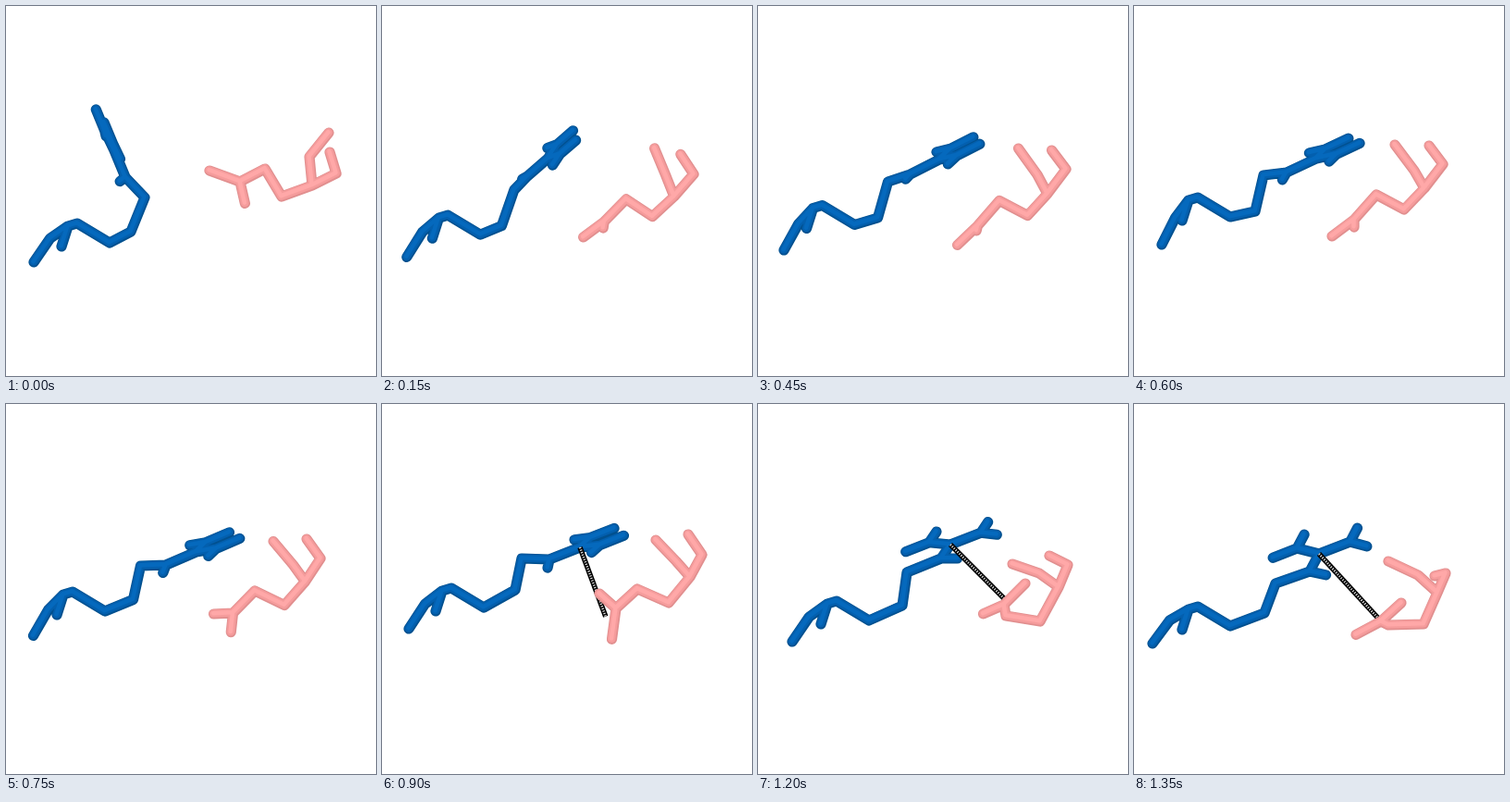
An HTML page for the animation above (1500 ms loop, 400 by 400 pixels).

```html
<!DOCTYPE html>
<html lang="en">
<head>
<meta charset="utf-8">
<title>Two molecules</title>
<style>
html, body { margin: 0; width: 100%; height: 100%; overflow: hidden; background: #fff; }
svg { display: block; width: 100%; height: 100%; }
path { fill: none; stroke-linecap: round; stroke-linejoin: round; }
.pose { opacity: 0; animation: show 1.5s step-end infinite; animation-delay: calc((var(--i) - 10) * 150ms); }
@keyframes show { 0% { opacity: 1; } 10%, 100% { opacity: 0; } }
.blue { --edge: #01508f; --body: #035fae; --shine: #0569bd; }
.pink { --edge: #e18f8f; --body: #f59c9c; --shine: #ffa8a8; }
.edge { stroke: var(--edge); stroke-width: 11.2; }
.body { stroke: var(--body); stroke-width: 8.6; transform: translate(-.3px, -.5px); }
.shine { stroke: var(--shine); stroke-width: 4.6; transform: translate(-.5px, -.8px); }
.link path { stroke: #000; stroke-width: 5.6; stroke-linecap: butt; }
.link .gaps { stroke: #ddd; stroke-width: 2.6; stroke-dasharray: 1.2 1.5; }
</style>
</head>
<body>
<svg id="stage" viewBox="0 0 400 400"></svg>
<script>
const points = text => text.split(' ').map(p => p.split(',').map(Number));
const mix = (a, b, t) => a.map((p, i) => p.map((v, k) => v + (b[i][k] - v) * t));

// blue: tail tip, tail root, two bends, centre of the flat head and its two axes.
// pink: oxygen, its carbon, then the chain to the fork and both prongs.
const pose = (blue, pink, linked) => ({ blue: points(blue), pink: points(pink), linked });
const between = (a, b, t) => ({ blue: mix(a.blue, b.blue, t), pink: mix(a.pink, b.pink, t) });

const folded = pose(
  '30,277 77,235 135,244 150,207 117,156 5,8 12,29',
  '220,178 253,190 280,176 298,206 331,194 328,163 349,137 357,181 350,158');
const reaching = pose(
  '26,270 70,224 128,236 141,197 195,167 1,5.5 -31,17',
  '217,268 237,244 260,217 291,233 312,209 301,187 281,158 332,182 316,161');
const level = pose(
  '30,258 69,207 131,222 140,183 197,165 7,3 -32,15',
  '214,249 238,231 262,204 292,220 314,197 303,178 282,150 334,171 319,151');
const touching = pose(
  '29,243 75,199 144,201 151,167 214,155 6,4.5 -33,13',
  '235,205 253,221 276,200 310,215 333,187 318,170 296,147 346,163 331,141', true);
const spread = pose(
  '32,245 86,209 155,212 161,181 203,141 33,-5 -7,22',
  '253,214 267,228 282,200 313,214 334,185 315,176 285,159 345,157 328,136');
const bonded = pose(
  '37,257 85,213 156,218 161,182 208,152 32,-6 -10,15',
  '289,194 266,217 268,229 305,235 325,198 304,183 275,173 335,174 315,164', true);
const relaxed = pose(
  '20,259 69,219 141,226 153,194 200,162 33,-4 -10,19',
  '289,215 267,235 275,239 313,238 328,204 307,185 275,170 337,183 325,186', true);

const poses = [
  folded, between(folded, reaching, .8), reaching, between(reaching, level, .5), level,
  between(level, touching, .5), touching, spread, bonded, relaxed
];

const add = ([x, y], [dx, dy], s = 1) => [x + dx * s, y + dy * s];
const sub = (a, b) => add(a, b, -1);
const path = chains => chains.map(c => 'M' + c.map(p => p.join(' ')).join('L')).join('');

// Three equal bonds around a flat atom cancel out, which gives the third one.
const third = (atom, a, b, length) => add(atom, add(sub(a, atom), sub(b, atom)), -length);

function bluePath([tip, root, low, high, centre, u, v]) {
  const tail = add(add(root, sub(tip, root), .62), [0, -10]);
  const neck = add(root, [-10, 3]);
  const at = (x, y) => add(add(centre, u, x), v, y);
  const joint = at(0, 1);
  const arm = side => [centre, at(side * .87, -.5), at(side * 1.54, -.1)];
  const twig = side => [at(side * .87, -.5), at(side * .87, -1.28)];
  return path([
    [tip, tail, neck, root, add(root, [35, 21]), low, high, joint, centre],
    [neck, add(root, [-17, 25])],
    [joint, third(joint, high, centre, .65)],
    arm(-1), arm(1), twig(-1), twig(1)
  ]);
}

const oxygens = ([a, carbon, next]) => [a, third(carbon, a, next, .9)];

function pinkPath(keys) {
  const fork = keys[4];
  return path([keys.slice(0, 7), [oxygens(keys)[1], keys[1]], [fork, ...keys.slice(7)]]);
}

// The bond runs from the blue centre to the middle of the two oxygens.
function link({ blue, pink }) {
  const [a, b] = oxygens(pink);
  const d = path([[blue[4], add(a, sub(b, a), .5)]]);
  return `<g class="link"><path d="${d}"/><path class="gaps" d="${d}"/></g>`;
}

const tube = (name, d) =>
  `<g class="${name}">` + ['edge', 'body', 'shine'].map(c => `<path class="${c}" d="${d}"/>`).join('') + '</g>';

document.getElementById('stage').innerHTML = poses.map((p, i) =>
  `<g class="pose" style="--i:${i}">` +
  tube('blue', bluePath(p.blue)) + (p.linked ? link(p) : '') + tube('pink', pinkPath(p.pink)) +
  '</g>').join('');
</script>
</body>
</html>
```
